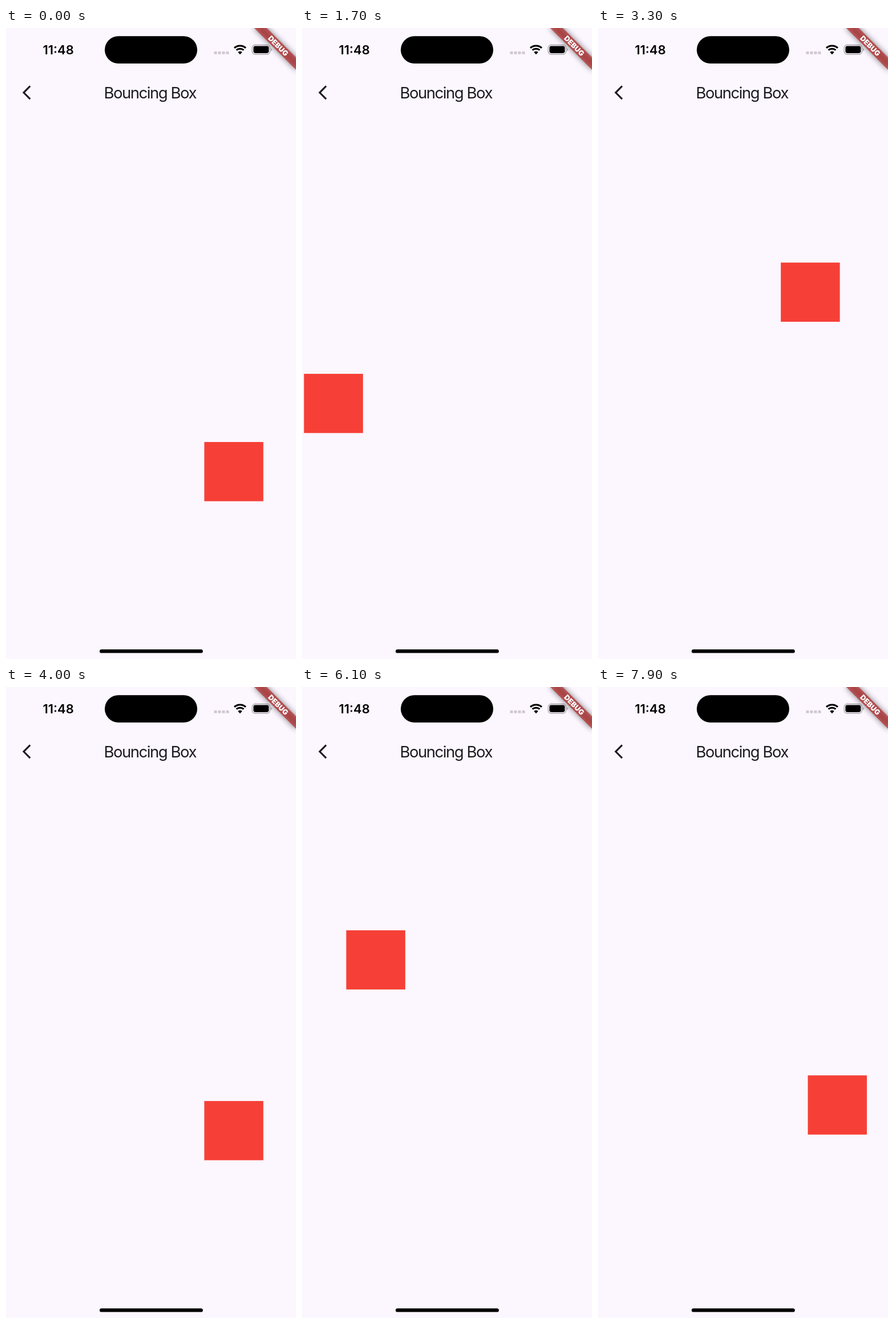
An HTML page that plays this animation: 508x1102 px, repeating every 8 s.

```html
<!DOCTYPE html>
<html lang="en">
<head>
<meta charset="utf-8">
<title>Bouncing Box</title>
<style>
  html, body { margin: 0; width: 100%; height: 100%; overflow: hidden; background: #fcf6fe; }
  svg { display: block; width: 100%; height: 100%; }
  text { font-family: Inter, "Open Sans", sans-serif; font-optical-sizing: none; }
  .title { font-size: 27.5px; letter-spacing: -1.47px; fill: #1d1b20; }
  .clock { font-size: 22px; font-weight: 600; }
  .debug { font-size: 12.6px; font-weight: 900; fill: #fff; text-anchor: middle; }
</style>
</head>
<body>
<svg viewBox="0 0 508 1102">
  <defs>
    <rect id="box" width="103.4" height="103.4"/>
    <rect id="home" x="164" y="1085.2" width="180.8" height="6.4" rx="3.2"/>
    <rect id="band" x="-51.7" y="36.2" width="103.4" height="15.5"/>
    <clipPath id="underBox"><use class="mover" href="#box"/></clipPath>
    <filter id="soft" x="-30%" y="-150%" width="160%" height="400%">
      <feGaussianBlur stdDeviation="5.1"/>
    </filter>
  </defs>

  <use class="mover" href="#box" fill="#f64037"/>

  <!-- status bar -->
  <text class="clock" x="64.5" y="46">11:48</text>
  <rect x="173" y="14.3" width="162" height="47.8" rx="23.9"/>
  <path d="M364.5 43.4h26" stroke="#cfc8d2" stroke-width="4.8" stroke-dasharray="5 2"/>
  <g fill="none" stroke="#000" stroke-width="3.1">
    <path d="M400 34.9a14.6 14.6 0 0 1 20 0"/>
    <path d="M403.6 38.7a9.4 9.4 0 0 1 12.8 0"/>
  </g>
  <path d="M410 46.2l-3.7 -3.9a5.4 5.4 0 0 1 7.4 0z"/>
  <rect x="431.2" y="29.5" width="31.3" height="16.5" rx="5.2" fill="none" stroke="#a9a4ab" stroke-width="1.3"/>
  <rect x="433.4" y="31.6" width="27" height="12.3" rx="3.3"/>
  <path d="M464.2 35.2q1.8 .8 1.8 2.6t-1.8 2.6z" fill="#a9a4ab"/>

  <!-- app bar -->
  <path d="M42.3 101.4L31 112.8L42.3 124.2" fill="none" stroke="#1d1b20" stroke-width="3.1"/>
  <text class="title" x="171.5" y="123">Bouncing Box</text>

  <g transform="translate(508 0) rotate(45)">
    <use href="#band" opacity=".5" filter="url(#soft)"/>
    <use href="#band" fill="#b71c1c" fill-opacity=".627"/>
    <text class="debug" x="0" y="48.6">DEBUG</text>
  </g>

  <use href="#home"/>
  <g clip-path="url(#underBox)"><use href="#home" fill="#24282d"/></g>
</svg>
<script>
  const LOOP = 8000, STEP = 100, SWEEP = 2000;
  const RANGE_X = 404.6, RANGE_Y = 895.4, TOP = 148.65;
  const movers = document.querySelectorAll('.mover');

  // Triangle wave from 0 to 1 and back, zero at `start`
  const bounce = (t, start) => {
    const phase = (t - start + 2 * LOOP) % (2 * SWEEP) / SWEEP;
    return phase < 1 ? phase : 2 - phase;
  };

  function draw() {
    const t = Math.floor(performance.now() % LOOP / STEP) * STEP;
    const x = RANGE_X * bounce(t, 1717);
    const y = TOP + RANGE_Y * bounce(t, 2717);
    for (const m of movers) m.setAttribute('transform', `translate(${x} ${y})`);
    requestAnimationFrame(draw);
  }
  draw();
</script>
</body>
</html>
```
